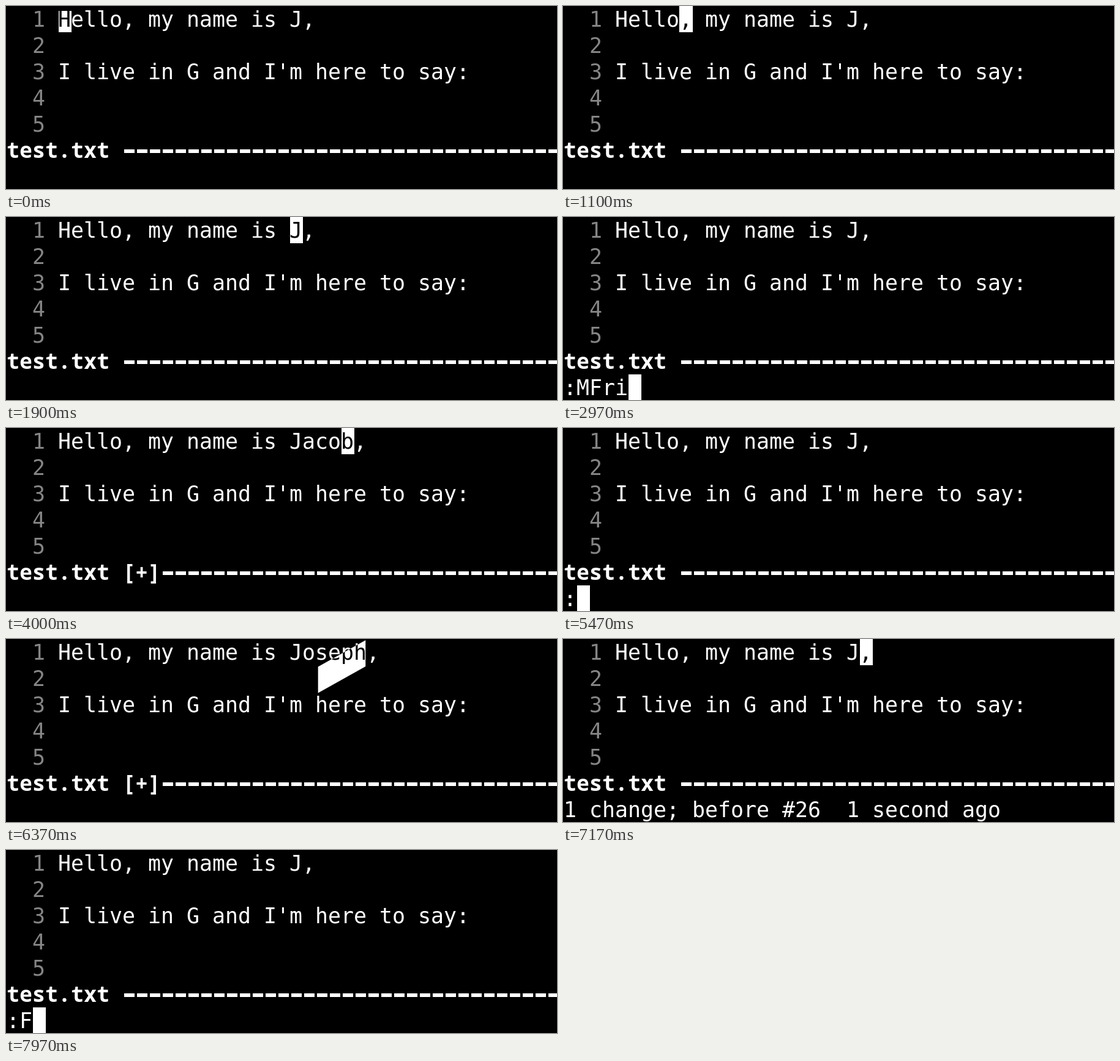
These frames come from a looping animation (900x300 px, 8000 ms). An HTML page:

```html
<!DOCTYPE html>
<html lang="en">
<head>
<meta charset="utf-8">
<title>Editor session</title>
<style>
  html, body { margin: 0; width: 100%; height: 100%; overflow: hidden; background: #000; }
  #stage {
    position: relative; width: 900px; height: 300px; overflow: hidden;
    background: #000; color: #fff; isolation: isolate;
    font: 34.88px/45px "DejaVu Sans Mono", "Noto Sans Mono", monospace;
    font-variant-ligatures: none;
  }
  .row { position: absolute; left: 1px; height: 43px; white-space: pre; }
  .num { color: #858585; }
  #status { top: 215px; font: 700 35px/42px "Noto Sans Mono", "DejaVu Sans Mono", monospace; }
  #rule {
    position: absolute; top: 235px; right: 0; height: 6px;
    background: repeating-linear-gradient(90deg, #0000 0 2px, #fff 2px 19px, #0000 19px 21px);
  }
  #cmd { top: 258px; }
  svg { position: absolute; inset: 0; mix-blend-mode: difference; }
</style>
</head>
<body>
<div id="stage">
  <div class="row" style="top:0"><span class="num">  1 </span>Hello, my name is <span id="name">J</span>,</div>
  <div class="row num" style="top:43px">  2</div>
  <div class="row" style="top:86px"><span class="num">  3 </span>I live in G and I'm here to say:</div>
  <div class="row num" style="top:129px">  4</div>
  <div class="row num" style="top:172px">  5</div>
  <div class="row" id="status">test.txt</div>
  <div id="rule"></div>
  <div class="row" id="cmd"></div>
  <svg width="900" height="300"><polygon id="cursor" fill="#fff"/></svg>
</div>
<script>
  const LOOP = 8000, CW = 21, CH = 43, X0 = 2, TEXT = 4, CMD_ROW = 6;
  const COMMAND = ":MFriends J";
  const $ = id => document.getElementById(id);

  // Each step keeps the state of the one before unless it changes it.
  const steps = [{ t: 0, name: "J", cmd: "", col: TEXT, row: 0, dur: 0 }];
  const add = (t, change) => steps.push({ ...steps[steps.length - 1], ...change, t });

  const moveTo = (t, col) => add(t, { col: TEXT + col, row: 0, dur: 130 });
  const type = (t, cmd, dur = 70) => add(t, { cmd, col: cmd.length, row: CMD_ROW, dur });
  const enter = (t, name) =>
    add(t, { name, cmd: "", col: TEXT + 17 + name.length, row: 0, dur: 230 });
  const undo = (t, id) => add(t, {
    name: "J", cmd: `1 change; before #${id}  1 second ago`, col: TEXT + 19, row: 0, dur: 230
  });

  [5, 7, 10, 15, 18].forEach((col, i) => moveTo(1000 + i * 125, col));
  type(1930, ":", 0);
  [2400, 2630, 2770, 2900, 3030, 3130, 3230, 3320, 3410, 3500]
    .forEach((t, i) => type(t, COMMAND.slice(0, i + 2)));
  enter(3600, "Jacob");
  undo(4500, 25);
  moveTo(5200, 18);
  type(5470, ":", 0);
  type(5800, COMMAND);
  enter(6270, "Joseph");
  undo(6670, 26);
  moveTo(7500, 18);
  type(7730, ":", 0);
  type(7890, ":F");

  const easeOut = p => 1 - (1 - Math.min(1, Math.max(0, p))) ** 3;

  // Corners facing the direction of travel arrive first, the others trail.
  function cursorPoints(from, to, age) {
    const dx = (to.col - from.col) * CW, dy = (to.row - from.row) * CH;
    return [[0, 0], [1, 0], [1, 1], [0, 1]].map(([cx, cy]) => {
      const ahead = dx * (cx - 0.5) + dy * (cy - 0.5) > 0;
      const k = to.dur ? easeOut(age / (to.dur * (ahead ? 0.55 : 1))) : 1;
      return [X0 + (from.col + cx) * CW + dx * k, (from.row + cy) * CH + dy * k];
    });
  }

  function draw(t) {
    let i = steps.length - 1;
    while (steps[i].t > t) i--;
    const now = steps[i], edited = now.name !== "J";
    $("name").textContent = now.name;
    $("cmd").textContent = now.cmd;
    $("status").textContent = edited ? "test.txt [+]" : "test.txt";
    $("rule").style.left = X0 + CW * (edited ? 12 : 9) + "px";

    const points = cursorPoints(steps[Math.max(0, i - 1)], now, t - now.t);
    if (i === 0) {
      const settle = 8 * (1 - easeOut((t - 30) / 240));
      points[0][1] += settle;
      points[1][1] += settle;
    }
    $("cursor").setAttribute("points", points.join(" "));
  }

  const start = performance.now();
  function tick() {
    draw((performance.now() - start) % LOOP);
    requestAnimationFrame(tick);
  }
  tick();
</script>
</body>
</html>
```
